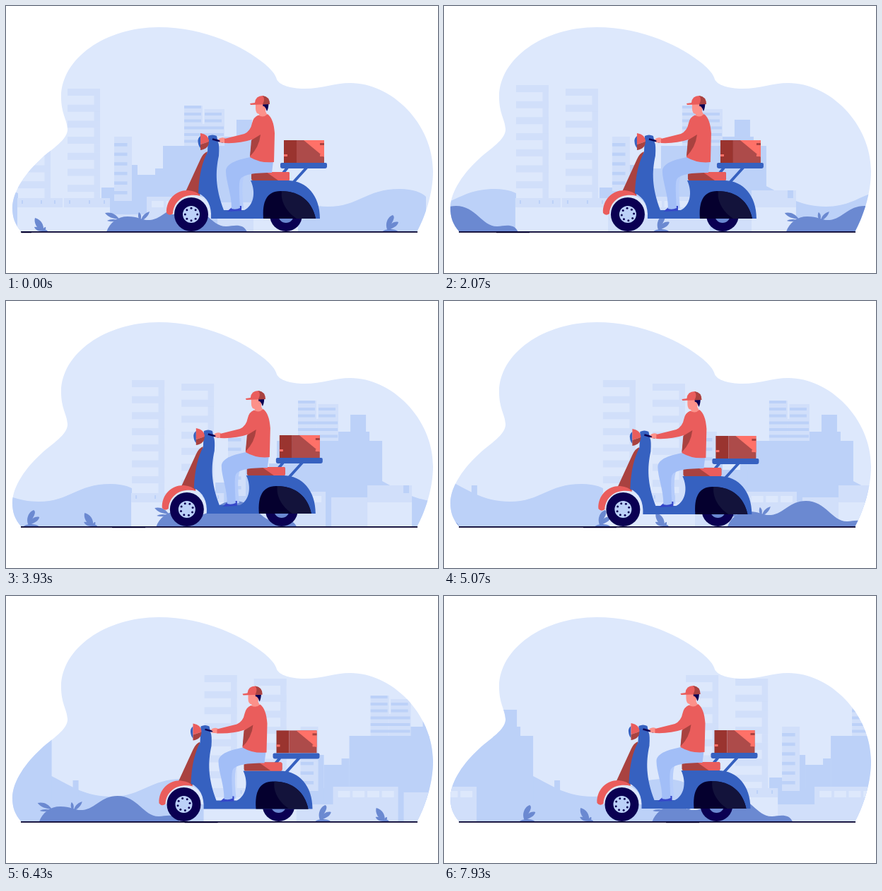
An HTML page with a canvas for the animation above (8000 ms loop, 611 by 378 pixels).

```html
<!DOCTYPE html>
<html lang="en">
<head>
<meta charset="utf-8">
<title>Scooter delivery</title>
<style>
  html, body { margin: 0; height: 100%; overflow: hidden; background: #fff; }
  canvas { display: block; }
</style>
</head>
<body>
<canvas id="stage" width="611" height="378"></canvas>
<script>
const ctx = document.getElementById('stage').getContext('2d');

const LOOP = 8000, STEP = LOOP / 112;
const CITY_SPEED = 41, CITY_PERIOD = 570;
const FRONT_SPEED = 165, FRONT_PERIOD = 578;

const SKY = '#dde8fc', PALE = '#d1dffa', MID = '#bcd1f8', SHRUB = '#6b89d1';
const BLUE = '#3661c0', NAVY = '#0a0052', INK = '#05002e';
const RED = '#ea5d5c', BRIGHT = '#ff7168', DARK_RED = '#a94240', BROWN = '#9a342f';
const SKIN = '#fc918a', PANTS = '#a2bef7', PANTS_FAR = '#b5ccfb';

const cloud = new Path2D(`M22 320C12 309 9 298 9 286C9 262 29 235 50 216
  C64 203 88 189 87 174C86 160 78 152 78 129C78 74 141 30 216 30
  C282 30 337 58 366 82C374 89 381 96 383 104C387 112 402 117 422 117
  C448 117 464 109 487 109C545 109 604 166 604 234C604 265 593 298 581 320Z`);

function shape(color, d) {
  ctx.fillStyle = color;
  ctx.fill(new Path2D(d));
}

function box(color, left, top, right, bottom) {
  ctx.fillStyle = color;
  ctx.fillRect(left, top, right - left, bottom - top);
}

function disc(color, x, y, r) {
  ctx.fillStyle = color;
  ctx.beginPath();
  ctx.arc(x, y, r, 0, 7);
  ctx.fill();
}

function stroke(color, width, d) {
  ctx.strokeStyle = color;
  ctx.lineWidth = width;
  ctx.stroke(new Path2D(d));
}

function shifted(x, y, draw) {
  ctx.save();
  ctx.translate(x, y);
  draw();
  ctx.restore();
}

// ---- City ----

function hill() {
  shape(MID, `M360 320V249L371 255C400 270 420 284 455 284C500 284 508 259 557 259
    C576 259 588 264 594 270V320Z`);
  box(MID, 401, 261, 409, 285);
}

function tower(left, top) {
  box(SKY, left, top, left + 46, 272);
  box(PALE, left + 37.5, top, left + 46, 272);
  for (let y = top; y < 270; y += 22.7) {
    box(PALE, left, y, left + 46, Math.min(y + 10, 272));
  }
}

function wall() {
  box(SKY, 16, 272, 147, 320);
  box(PALE, 16, 272, 80, 285);
  box(PALE, 82, 272, 147, 285);
  for (const x of [22, 49, 68, 89, 117, 138]) box(MID, x, 275, x + 2, 280);
}

function blocks() {
  box(PALE, 147, 295, 200, 320);
  box(MID, 135, 257, 154, 272);
  box(MID, 147, 272, 200, 295);
  box(MID, 173, 225, 186, 295);
  box(MID, 186, 239, 222, 295);
  box(MID, 211, 230, 222, 295);
  box(MID, 222, 198, 371, 320);
  box(MID, 305, 185, 353, 200);
  box(MID, 326, 161, 348, 186);

  box(PALE, 153, 185, 178, 276);
  for (let y = 194; y < 270; y += 13.6) box(MID, 153, y, 171.5, y + 4.6);

  box(PALE, 252, 141, 278, 198);
  box(PALE, 280.5, 146, 309, 198);
  box(PALE, 278, 167, 281, 198);
  for (const y of [141, 151, 160.5]) box(MID, 252, y, 276, y + 4);
  for (const y of [151, 160.5]) box(MID, 281, y, 305, y + 4);
  for (const y of [170.5, 180, 189.5]) box(MID, 252, y, 308, y + 4);
}

function shop() {
  box(PALE, 199, 270, 291, 320);
  for (let x = 206; x < 280; x += 20.7) box(SKY, x, 276, x + 17, 285);
}

function annex() {
  box(PALE, 299, 278, 350, 320);
  box(PALE, 350, 261, 413, 285);
  box(SKY, 350, 285, 413, 320);
  box(MID, 401, 261, 409, 272);
}

function city(seconds) {
  const x = CITY_SPEED * seconds;
  for (const copy of [-CITY_PERIOD, 0]) shifted(x + copy, 0, hill);
  for (const copy of [-CITY_PERIOD, 0]) shifted(x + copy, 0, () => {
    blocks();
    tower(17, 112);
    tower(87, 117);
    wall();
    shop();
  });
  shifted(x, 0, annex);
}

// ---- Foreground ----

function bank() {
  shape(SHRUB, `M0 320C5 306 16 298 30 298C46 298 50 304 62 303
    C80 301 88 283 111 283C140 283 148 313 170 312C180 311 194 307 199 320Z`);
  shape(SHRUB, 'M18 302C14 294 5 291-2 293C2 299 10 301 18 302Z');
  shape(SHRUB, 'M16 303C10 301 4 302 1 304C7 306 11 305 16 303Z');
  shape(SHRUB, 'M48 304C50 298 49 294 46 292C44 296 45 301 48 304Z');
  shape(SHRUB, 'M49 304C56 301 60 296 61 291C54 293 50 298 49 304Z');
}

function tallPlant() {
  shape(SHRUB, 'M-3 318C-8 309-3 298 4 296C9 299 2 308-3 318Z');
  shape(SHRUB, 'M-3 318C-2 309 6 304 12 306C11 312 4 314-3 318Z');
  shape(SHRUB, 'M-10 319C-7 315 8 315 11 319Z');
}

function lowPlant() {
  shape(SHRUB, 'M4 319C-6 316-10 306-8 300C0 302 5 309 4 319Z');
  shape(SHRUB, 'M2 319C-4 319-8 316-9 313C-4 312 0 315 2 319Z');
  shape(SHRUB, 'M4 319C3 315 5 313 7 313C8 316 6 318 4 319Z');
  shape(SHRUB, 'M0 319Q8 314 10 319Z');
}

function foreground(seconds) {
  const x = FRONT_SPEED * seconds;
  for (let copy = 0; copy < 4; copy++) {
    const left = x - copy * FRONT_PERIOD;
    shifted(left + 142, 0, bank);
    shifted(left + 49, 0, lowPlant);
    shifted(left + 543, 0, tallPlant);
  }
}

// ---- Scooter and rider ----

function wheels(seconds) {
  disc(NAVY, 396, 296, 23);
  disc(SHRUB, 396, 296, 11);
  stroke(SKY, 5, 'M236 295A26 26 0 0 1 288 295');
  disc(NAVY, 262, 295, 24);
  disc(MID, 262, 295, 12);
  for (let i = 0; i < 8; i++) {
    const angle = i * Math.PI / 4 - seconds * FRONT_SPEED / 24;
    disc(NAVY, 262 + 8.7 * Math.cos(angle), 295 + 8.7 * Math.sin(angle), 1.5);
  }
}

function scooter() {
  stroke(BLUE, 4, 'M398 229L388 241M426 228L406 250');
  shape(DARK_RED, 'M285 206Q279 208 275 217L253 265L274 268Z');
  shape(RED, `M227 293C226 273 242 260 258 261Q270 262 275 269
    C254 264 237 275 236 294Q231 298 227 293Z`);
  shape(BLUE, `M286 184Q292 181 298 184L300 193Q302 197 301 212
    C296 235 296 257 308 289H337C350 283 354 264 346 247H400
    C425 248 444 268 444 301H290C291 283 285 271 272 265
    C273 238 278 220 285 207Z`);
  shape(INK, 'M364 301C362 277 369 262 388 262C416 262 433 277 438 301Z');
  shape('#13133b', 'M390 262C417 262 433 278 438 301H411C396 291 388 276 390 262Z');
  shape(DARK_RED, 'M349 235H399Q401 235 401 237V245Q401 247 399 247H349Q347 247 347 244V237Q347 235 349 235Z');
  shape(RED, 'M368 235H399Q401 235 401 237V245Q401 247 399 247H385Z');
  shape(BLUE, 'M275 184Q271 187 271.5 192Q272 198 275 201Z');
  shape(RED, 'M275 180Q287 182 287 192L275 196Z');
  shape(DARK_RED, 'M275 196L287 192Q287 202 275 204Z');
}

function parcel() {
  box(BROWN, 393, 190, 411, 222);
  box('#ad4b4a', 411, 190, 450, 222);
  shape(BRIGHT, 'M421 190H450V214Z');
  box(BRIGHT, 393, 210, 398, 213);
  box(BRIGHT, 444, 210, 450, 213);
  box(DARK_RED, 444, 194, 450, 197);
  shape(BLUE, 'M390 222H452Q454 222 454 224V227Q454 230 451 230H391Q388 230 388 227V224Q388 222 390 222Z');
}

function rider() {
  shape(PANTS_FAR, 'M328 242L338 237C333 248 334 264 336 286L326 288Z');
  shape('#3547c8', 'M313 291Q319 284 325 283H333V290Z');
  shape(PANTS, `M346 214C330 217 311 222 311 234C311 248 319 266 319 287
    Q325 289 331 286C330 266 329 252 331 246C334 240 345 236 376 236L378 220Z`);
  stroke(NAVY, 2.5, 'M292 188.5L307 192.5');
  shape(SKIN, 'M310 187Q304 185 300 189L303 191L301 193L310 194Z');
  shape(SKIN, 'M353 138H369L367 149L370 155Q363 160 358 157V153Q353 152 353 145Z');
  shape(NAVY, 'M363 138H371.5Q371 146 369 149L367.5 145Q365 141 363.5 142Z');
  shape(RED, `M357 154.5Q364 159 370 153C376 158 379 166 380 180L379 221
    Q360 223 345 214L348 189Q330 195 309 194V188L337 181
    Q346 177 348 166Q350 157 357 154.5Z`);
  shape(DARK_RED, 'M347 190L360 182Q358 200 345 213Z');
  shape(RED, 'M345 138L352 137Q353 127 363 127Q373 129 373 139L346 140Z');
  shape(DARK_RED, 'M363 127Q373 128 373 139H363Q367 132 363 127Z');
}

function delivery(seconds) {
  const drift = -5.4 * (1 - Math.cos(Math.PI * seconds / 7.2));
  const bob = 0.5 * (1 - Math.cos(Math.PI * seconds));
  shifted(drift, 0, () => wheels(seconds));
  shifted(drift, bob, () => {
    scooter();
    parcel();
    rider();
  });
}

function draw(now) {
  // The small lead absorbs clocks rounded down to whole centiseconds.
  const seconds = Math.floor((now % LOOP) / STEP + 0.1) * STEP / 1000;
  ctx.clearRect(0, 0, 611, 378);
  ctx.save();
  ctx.clip(cloud);
  box(SKY, 0, 0, 611, 320);
  city(seconds);
  foreground(seconds);
  ctx.restore();
  delivery(seconds);
  box(INK, 21, 319, 582, 320.8);
  const markLeft = CITY_SPEED * seconds - 11;
  box(INK, Math.max(22, markLeft), 319, markLeft + 47, 321.2);
}

const start = performance.now();
function tick() {
  draw(performance.now() - start);
  requestAnimationFrame(tick);
}
tick();
</script>
</body>
</html>
```
